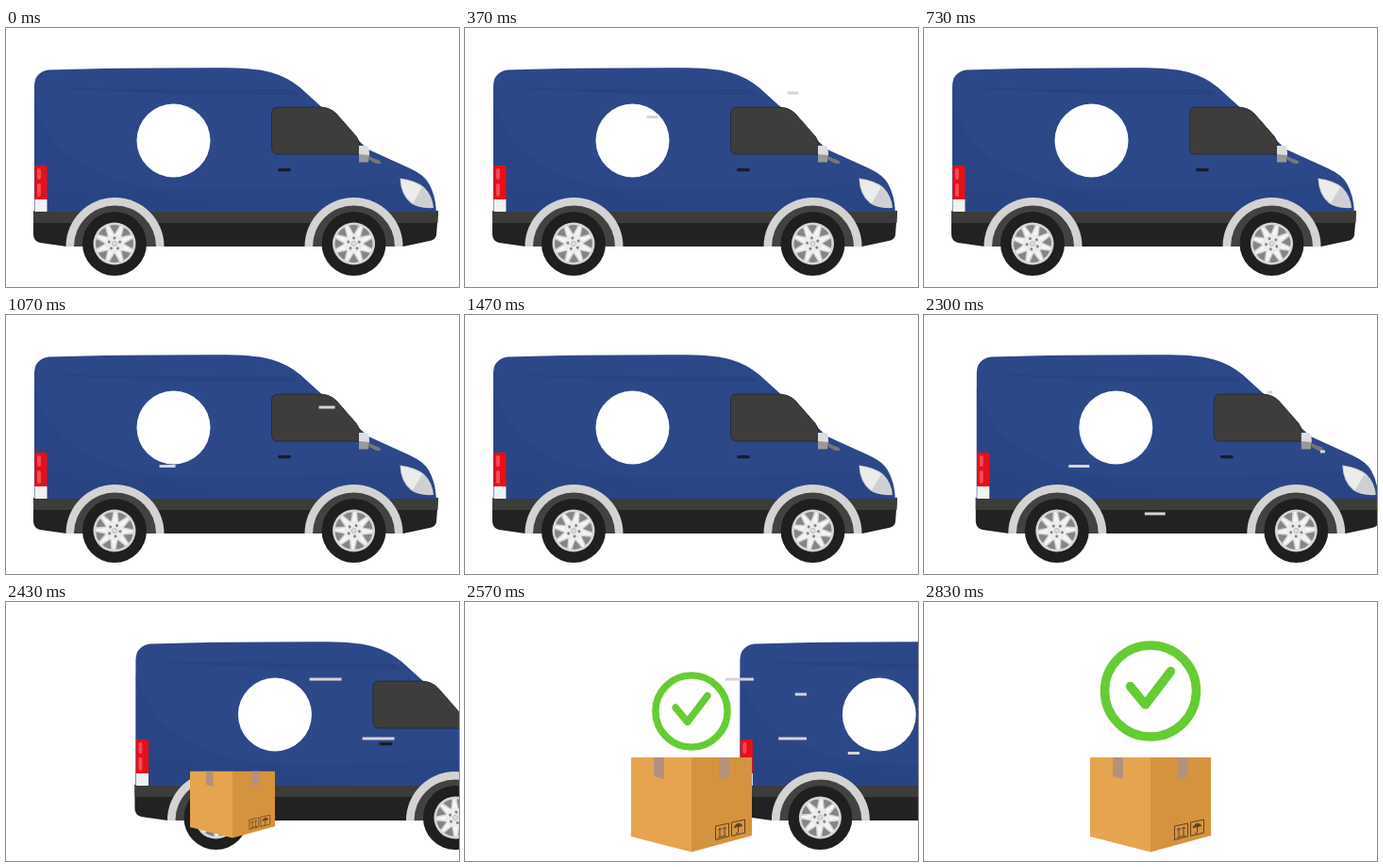
These frames come from a looping animation (480x275 px, 3610 ms). An HTML page:

```html
<!DOCTYPE html>
<html lang="en">
<head>
<meta charset="utf-8">
<title>Delivery van</title>
<style>
  html, body { margin: 0; width: 100%; height: 100%; overflow: hidden; background: #fff; }
  svg { display: block; width: 100%; height: 100%; }
</style>
</head>
<body>
<svg viewBox="0 0 480 275">
  <defs>
    <g id="arch">
      <path d="M-52 3 A52 52 0 0 1 52 3 Z" fill="#d3d3d3"/>
      <path d="M-43.500 3 A43.500 43.500 0 0 1 43.500 3 Z" fill="#424241"/>
    </g>
  </defs>

  <g id="van">
    <path d="M29 194 H458 L456 220 Q455 225 449 226 L421 232 H64 L36 228 Q29 226 29 219 Z" fill="#222221"/>
    <path d="M29 194 H458 L457.500 207 H29 Z" fill="#3c3c3b"/>
    <path d="M30 195 V62 Q30 47 45 44.500 Q130 42 235 42.300 Q268 43 282 47.500 Q298 52 312 63.500 L384 129 L428 149 Q443 156 448 165 Q455 177 456 195 Z" fill="#2c4888"/>
    <g fill="#284280">
      <path d="M30 76 Q45 142 130 165 Q200 178 260 195 H30 Z" opacity=".4"/>
      <path d="M44 166 Q220 176 415 166 L456 195 H44 Z" opacity=".4"/>
      <path d="M45 63 Q160 66 296 65 Q307 66 310 71 Q170 72 45 63 Z" opacity=".8"/>
    </g>

    <path d="M30.500 146 H41.500 Q43.500 146 43.500 148 V182 H30.500 Z" fill="#e60f1a"/>
    <rect x="33" y="149" width="4" height="12" rx="2" fill="#f04b54"/>
    <rect x="33" y="165" width="4" height="14" rx="2" fill="#f04b54"/>
    <path d="M30.500 182 H43.500 V195 H30.500 Z" fill="#f2f2f2"/>

    <path d="M288 84 H332 Q343 84 350 91 L371 115 Q376 122 376 134 H288 Q281.500 134 281.500 127 V91 Q281.500 84 288 84 Z" fill="#3e3d3b" stroke="#242b3d"/>
    <path d="M374 125 H382 Q385 125 385 135 H374 Z" fill="#dedede"/>
    <path d="M374 134 L385 135 L384 142.500 H374 Z" fill="#999"/>
    <path d="M385 136 L391 139 Q398 140 397 144 L392 144 L385 140 Z" fill="#777"/>
    <rect x="288" y="149" width="14" height="3.200" rx="1.600" fill="#191c26"/>
    <path d="M417.500 159.500 Q435 162 443 169 Q452 178 453 191 Q437 192 429 186 Q418 177 417.500 159.500 Z" fill="#cfd0d2"/>
    <path d="M418.500 160.500 Q434 163 441 169 L431 186 Q419 177 418.500 160.500 Z" fill="#ececec"/>

    <circle cx="177.500" cy="119.500" r="39" fill="#fff"/>
    <use href="#arch" x="115.500" y="229"/>
    <use href="#arch" x="368.500" y="229"/>
    <g id="wheels"></g>
  </g>

  <g id="box">
    <path d="M176 165 H240 V265.500 L176 249 Z" fill="#e6a450"/>
    <path d="M240 165 H304 V248 L240 265.500 Z" fill="#d6933f"/>
    <path d="M200 165 H211 V188 L200 185 Z M269 188 V165 H280 V185 Z" fill="#b4917a"/>
    <g fill="none" stroke="#5f4320" stroke-width="1">
      <path d="M265.500 238 L279.500 235 V249 L265.500 252.500 Z M282.500 234 L296.500 231 V245 L282.500 248.500 Z"/>
      <path d="M270 249 V240 M268 242.500 L270 240 L272 241.500 M275 248 V239 M273 241 L275 239 L277 240.500 M268 250 L277 248"/>
      <path d="M289.500 238 V245 Q288 247 287 245"/>
      <path d="M285 239.500 Q289 232 294 237.500 Z" fill="#5f4320"/>
    </g>
  </g>

  <g id="check" fill="none" stroke="#66cc33">
    <circle cx="240" cy="94.500" r="48.500" stroke-width="9.500"/>
    <path d="M218.500 89.500 L234.500 109 L261.500 73.500" stroke-width="9.500" stroke-linecap="round" stroke-linejoin="round"/>
  </g>

  <g id="streaks" stroke="#d5d5d7" stroke-width="3"></g>
</svg>
<script>
const LOOP = 3610;
const STREAK_LIFE = 385;
const VAN_START = 2170;
const END = 2830;
const SPOKES = 8;
const $ = id => document.getElementById(id);
const clamp = v => Math.max(0, Math.min(1, v));
const easeOut = v => 1 - (1 - clamp(v)) ** 2;

function add(parent, tag, attrs) {
  const el = document.createElementNS('http://www.w3.org/2000/svg', tag);
  for (const [key, value] of Object.entries(attrs)) el.setAttribute(key, value);
  return parent.appendChild(el);
}

function makeWheel(x) {
  const wheel = add($('wheels'), 'g', { transform: `translate(${x} 229)` });
  add(wheel, 'circle', { r: 34, fill: '#1f1f1e' });
  add(wheel, 'circle', { r: 22.5, fill: '#d6d6d6' });
  const rim = add(wheel, 'g', {});
  for (let i = 0; i < SPOKES; i++) {
    const turn = `rotate(${i * 360 / SPOKES})`;
    add(rim, 'path', { d: 'M-5 -19 Q0 -21 5 -19 L0 -10.500 Z', fill: '#858585', transform: turn });
    add(rim, 'path', {
      d: 'M-2 -9 L0 -20 L2 -9 Z', fill: '#f5f5f5', stroke: '#f5f5f5', 'stroke-width': 1.5,
      transform: `rotate(${(i + .5) * 360 / SPOKES})`
    });
  }
  add(rim, 'circle', { r: 10, fill: '#ececec' });
  for (let i = 0; i < 5; i++) {
    add(rim, 'circle', { cy: -6, r: 1.5, fill: '#858585', transform: `rotate(${i * 72})` });
  }
  add(rim, 'circle', { r: 2.6, fill: '#dcdcdc', stroke: '#aaa', 'stroke-width': .6 });
  return rim;
}
const rims = [115, 368.5].map(makeWheel);

// Each streak: start time, y, right end, travel
const streaks = [
  [332, 69, 354, 122], [332, 94.5, 205, 122],
  [993, 98, 351, 96], [993, 160.5, 182, 96],
  [1578, 145, 218, 125], [1578, 195, 299, 125],
  [1855, 69, 366, 125], [1855, 131, 422, 125],
  [1980, 160.5, 257.5, 125], [1980, 211, 338, 125],
  [2285, 82, 369, 125], [2285, 145, 425, 125],
  [2520, 98, 363, 100], [2520, 160.5, 419, 100]
].map(([start, y, right, travel]) => ({
  start, right, travel, line: add($('streaks'), 'line', { y1: y, y2: y })
}));

function scaleAbout(el, scale, x, y) {
  el.style.display = scale > 0 ? '' : 'none';
  el.setAttribute('transform', `translate(${x} ${y}) scale(${scale}) translate(${-x} ${-y})`);
}

function draw(t) {
  const drive = 260 * (Math.max(0, t - VAN_START) / 400) ** 2.07;
  $('van').setAttribute('transform', `translate(${drive})`);
  $('van').style.display = t < END ? '' : 'none';
  rims.forEach(rim => rim.setAttribute('transform', `rotate(${t * .36})`));

  for (const { start, right, travel, line } of streaks) {
    const p = (t - start) / STREAK_LIFE;
    const visible = p > 0 && p < 1 && t < END;
    line.style.display = visible ? '' : 'none';
    if (!visible) continue;
    line.setAttribute('x1', right - travel * p);
    line.setAttribute('x2', right - travel * p ** 2.3);
  }

  scaleAbout($('box'), easeOut((t - 2340) / 200), 240, 215);
  scaleAbout($('check'), easeOut((t - 2456) / 214), 240, 195);
}

const began = performance.now();
function tick() {
  draw((performance.now() - began) % LOOP);
  requestAnimationFrame(tick);
}
tick();
</script>
</body>
</html>
```
